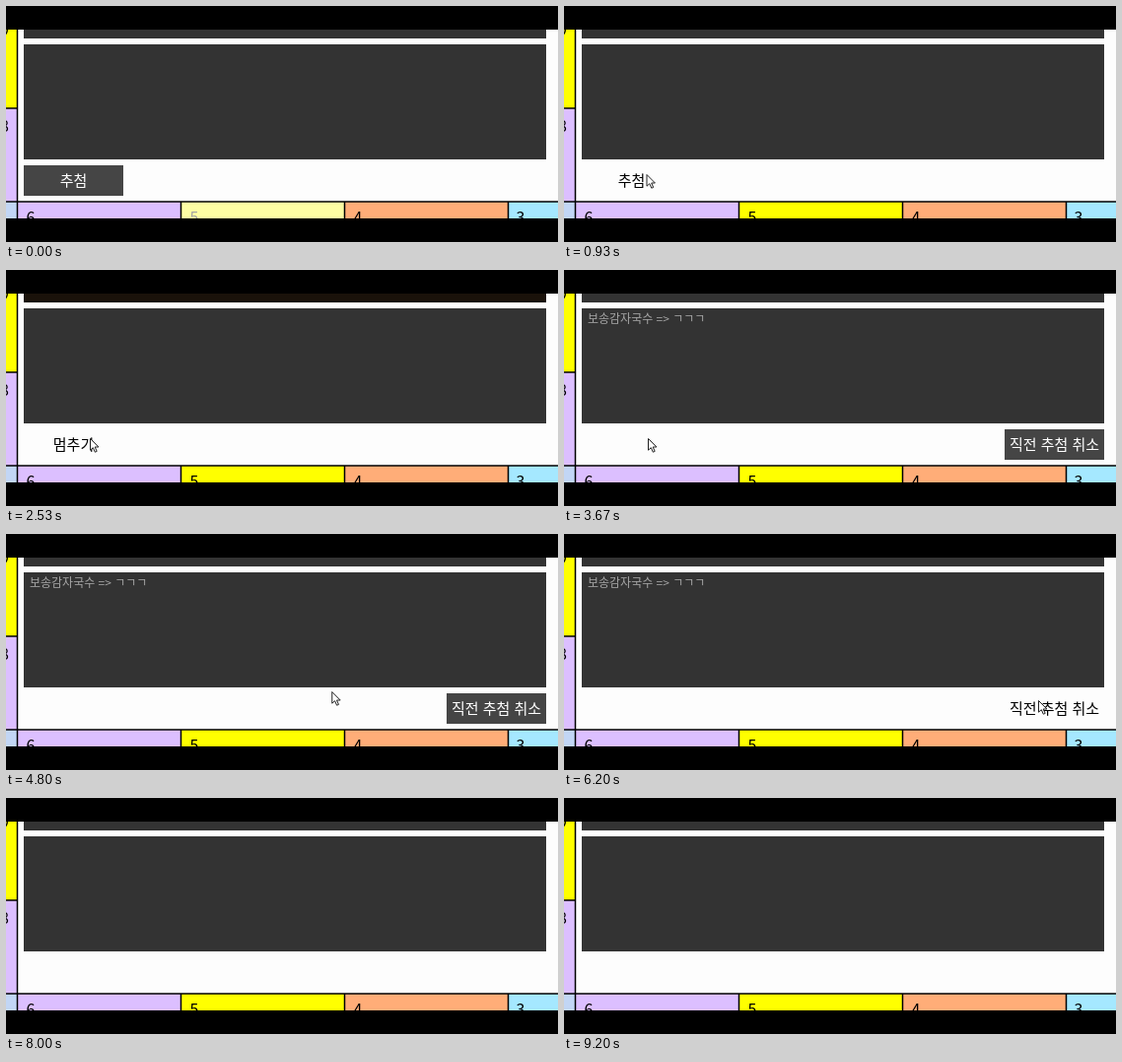
An HTML page for the animation above (9.27 s loop, 560 by 240 pixels).

```html
<!DOCTYPE html>
<html lang="ko">
<head>
<meta charset="utf-8">
<style>
html, body { margin: 0; width: 100%; height: 100%; overflow: hidden; background: #000; }
svg { display: block; width: 560px; height: 240px; }
text { font-family: "Noto Sans CJK KR", "Noto Sans CJK", "Noto Sans", sans-serif; }
.day { font-size: 16px; font-weight: 500; }
.label { font-size: 15px; text-anchor: middle; }
</style>
</head>
<body>
<svg viewBox="0 0 560 240">
  <defs><clipPath id="view"><rect y="24" width="560" height="192"/></clipPath></defs>
  <g clip-path="url(#view)">
    <rect y="24" width="560" height="192" fill="#fdfdfd"/>
    <g id="calendar"></g>
    <path d="M11.5 24V216M0 104H11M0 199H560M177.5 199V216M343.5 199V216M509.5 199V216" stroke="#000" stroke-width="1.5"/>
    <rect id="topBar" x="18" y="24" width="530" height="9" fill="#333"/>
    <rect x="18" y="39" width="530" height="117" fill="#333"/>
    <text id="result" x="24" y="53.5" font-size="12" fill="#a6a6a6">보송감자국수 =&gt; ㄱㄱㄱ</text>
    <g id="draw"><rect x="18" y="162" width="101" height="31"/><text class="label" x="68.5" y="183"></text></g>
    <g id="undo"><rect x="447" y="162" width="101" height="31"/><text class="label" x="497.5" y="183">직전 추첨 취소</text></g>
    <path id="cursor" d="M.5 .5V12.2L3.3 9.7 5.3 14.2 7.2 13.4 5.2 9H8.9Z" fill="#fff" stroke="#222" stroke-width="1"/>
  </g>
</svg>
<script>
const LOOP = 9270;
const START = 1500, STOP = 3500, CANCEL = 6700;
const $ = id => document.getElementById(id);

// x, y, width, height, colour, digit, digit x, baseline
const cells = [
  [0, 24, 11, 80, '#ffff00', '9', -6, 30],
  [0, 104, 11, 95, '#dcbfff', '8', -6, 127.5],
  [0, 199, 11, 17, '#c2d6f5', '', 0, 0],
  [12, 199, 165, 17, '#dcbfff', '6', 20.5, 221],
  [178, 199, 165, 17, '#ffff00', '5', 186.5, 221],
  [344, 199, 165, 17, '#ffad78', '4', 352.5, 221],
  [510, 199, 50, 17, '#a5e8ff', '3', 517.5, 221]
];
$('calendar').innerHTML = cells.map(([x, y, w, h, fill, digit, tx, ty]) =>
  `<g><rect x="${x}" y="${y}" width="${w}" height="${h}" fill="${fill}"/>` +
  `<text class="day" x="${tx}" y="${ty}">${digit}</text></g>`).join('');
const fadingCell = $('calendar').children[4];

// time, x, y of the pointer tip
const path = [
  [0, 130, 222], [350, 130, 222], [800, 83.5, 171], [1400, 83.5, 171], [1700, 85, 171],
  [4350, 85, 171], [4800, 330, 160], [5300, 481, 169], [6900, 481, 169],
  [7400, 440, 222], [LOOP, 440, 222]
];

const clamp = v => Math.max(0, Math.min(1, v));
const mix = (a, b, p) => a + (b - a) * p;
const grey = v => `rgb(${v},${v},${v})`;
const show = (id, on) => $(id).setAttribute('visibility', on ? 'visible' : 'hidden');

function pointer(t) {
  const i = path.findIndex((p, n) => n > 0 && t <= p[0]);
  const [t0, x0, y0] = path[i - 1], [t1, x1, y1] = path[i];
  const p = (t - t0) / (t1 - t0);
  return [mix(x0, x1, p), mix(y0, y1, p)];
}

function paintButton(id, hover) {
  const [box, label] = $(id).children;
  box.setAttribute('fill', grey(Math.round(mix(69, 253, hover))));
  label.setAttribute('fill', grey(Math.round(mix(255, 0, hover))));
}

function render(t) {
  const [x, y] = pointer(t);
  $('cursor').setAttribute('transform', `translate(${x} ${y})`);

  const rolling = t >= START && t < STOP;
  const decided = t >= STOP && t < CANCEL;
  $('draw').children[1].textContent = rolling ? '멈추기' : '추첨';
  $('topBar').setAttribute('fill', rolling ? '#1a120a' : '#333');
  show('draw', t < STOP);
  show('undo', decided);
  show('result', decided);

  paintButton('draw', clamp((t - 680) / 200));
  paintButton('undo', clamp((t - 5200) / 200));
  fadingCell.setAttribute('opacity', mix(0.35, 1, clamp((t - 40) / 250)));
}

function tick(now) {
  render(now % LOOP);
  requestAnimationFrame(tick);
}
render(0);
requestAnimationFrame(tick);
</script>
</body>
</html>
```
